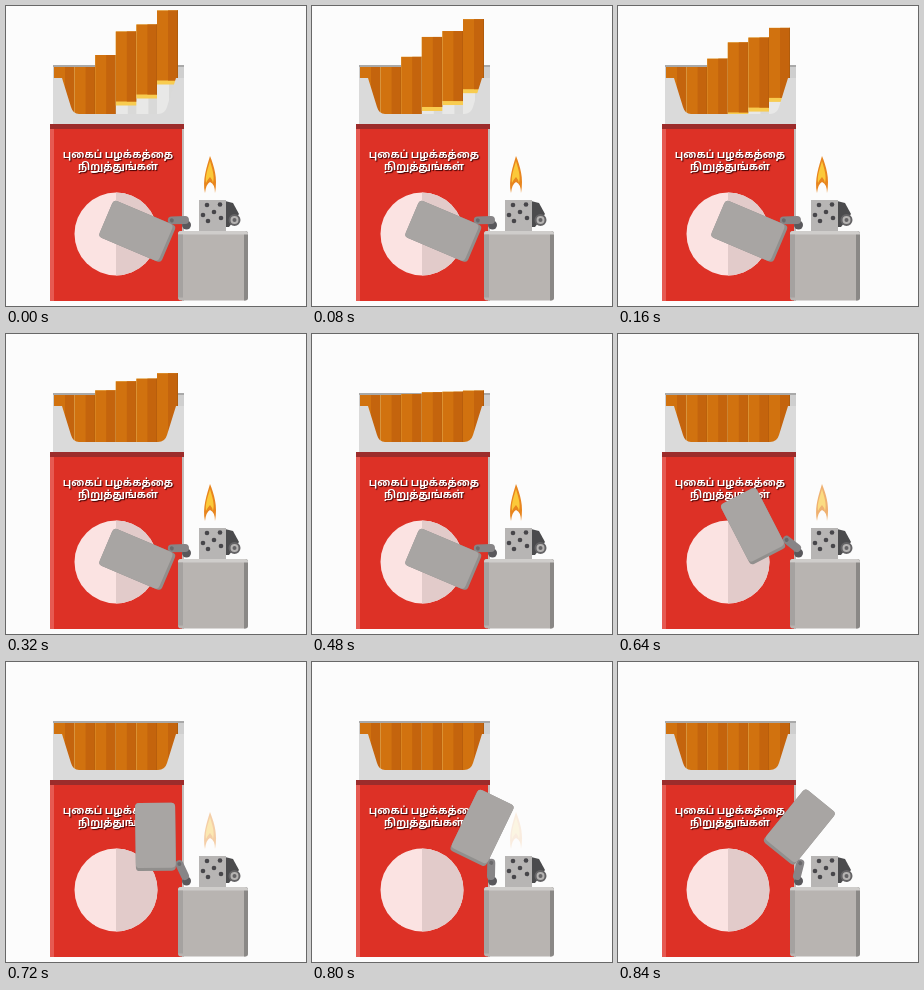
Write an HTML page that moves like this. It is 300x300 px and loops after 1.6 s.

```html
<!DOCTYPE html>
<html lang="ta">
<head>
<meta charset="utf-8">
<style>
html, body { margin: 0; width: 100%; height: 100%; overflow: hidden; background: #fcfcfc; }
svg { display: block; width: 100%; height: 100%; }
text { font: bold 10.2px "Noto Sans Tamil", "Noto Sans", sans-serif; fill: #fff; text-anchor: middle; text-shadow: 1px 1px 1px #400; }
</style>
</head>
<body>
<svg viewBox="0 0 300 300">
  <defs>
    <g id="cig">
      <rect width="21" height="120" fill="#e8e8e7"/>
      <rect x="12" width="9" height="120" fill="#d9d9d8"/>
      <rect width="21" height="74" fill="#f8cc50"/>
      <rect width="21" height="70" fill="#d1720f"/>
      <rect x="11" width="10" height="70" fill="#c4640d"/>
      <rect x="20" width="1" height="70" fill="#b05c0c"/>
    </g>
    <clipPath id="inside"><rect width="300" height="112"/></clipPath>
  </defs>

  <!-- pack -->
  <rect x="47" y="59" width="131" height="59" fill="#cfcfcf"/>
  <rect x="47" y="59" width="131" height="2" fill="#a9a9a9"/>
  <g id="cigs" clip-path="url(#inside)"></g>
  <path d="M47 72h9l9 29q2 7 8 7h79q7 0 9-7l9-29h8v46H47z" fill="#dadada"/>
  <rect x="44" y="118" width="132" height="177" fill="#dd3126"/>
  <rect x="44" y="118" width="4" height="177" fill="#e65a52"/>
  <rect x="176" y="118" width="2" height="177" fill="#c3bcba"/>
  <rect x="44" y="118" width="134" height="5" fill="#9c2c2b"/>
  <circle cx="110" cy="228" r="41.5" fill="#fbe3e2"/>
  <path d="M110 186.5a41.5 41.5 0 0 1 0 83z" fill="#e2cbca"/>
  <text x="112" y="151.5">புகைப் பழக்கத்தை</text>
  <text x="112" y="164">நிறுத்துங்கள்</text>

  <!-- lighter -->
  <g id="flame">
    <path d="M204 150C208 160 212 172 209 187Q209 178 204 176Q200 178 199 187C196 174 201 160 204 150z" fill="#e8851e"/>
    <path d="M204 155C206 162 209 170 207 177Q206 173 204 171Q202 173 200 177C199 170 202 162 204 155z" fill="#fbc93a"/>
  </g>
  <path d="M219 195l8 2 6 11-10 13h-4z" fill="#4b4b4d"/>
  <circle cx="228.5" cy="214" r="5" fill="#b5b3b2" stroke="#646365" stroke-width="2"/>
  <circle cx="228.5" cy="214" r="2" fill="#646365"/>
  <rect x="193" y="194" width="27" height="31" fill="#b7b5b4"/>
  <g id="holes" fill="#47464a"></g>
  <circle cx="180.5" cy="219" r="4.5" fill="#59585c"/>
  <rect x="172" y="225" width="70" height="69.5" rx="3" fill="#b8b4b1"/>
  <path d="M238 225h1q3 0 3 3v63.500q0 3-3 3h-1z" fill="#8a8886"/>
  <path d="M172 228.500v-.5q0-3 3-3h64q3 0 3 3v.5z" fill="#cfcdcb"/>
  <rect x="172" y="228.500" width="5" height="63" fill="#a5a2a0"/>
  <g id="lid">
    <path d="M-5.500-12L0 0" stroke="#878587" stroke-width="8" stroke-linecap="round"/>
    <circle cx="-5.500" cy="-12" r="2" fill="#6a696b"/>
    <rect x="-49" y="-73.500" width="40" height="68" rx="4" fill="#918f8d"/>
    <rect x="-49" y="-73.500" width="40" height="65" rx="4" fill="#a8a5a3"/>
  </g>
</svg>
<script>
const $ = id => document.getElementById(id);
const REST = 61, STEP = 40, LOOP = 1600, SWITCH = 520, END = 840;
const tops = [61, 61, 49, 25.5, 18.5, 4.5];
const holes = [[201, 199], [214, 198.5], [208, 206], [197, 209], [202, 215], [215, 212]];

$("cigs").innerHTML = tops.map(() => `<use href="#cig"/>`).join("");
$("holes").innerHTML = holes.map(([x, y]) => `<circle cx="${x}" cy="${y}" r="2.3"/>`).join("");
const cigs = [...$("cigs").children];

function draw(now) {
  const t = Math.floor(now % LOOP / STEP) * STEP;
  const sink = Math.min(1, t / SWITCH);
  const close = Math.max(0, Math.min(1, (t - SWITCH) / (END - SWITCH)));
  cigs.forEach((c, i) => {
    const y = tops[i] + (REST - tops[i]) * sink;
    c.setAttribute("transform", `translate(${48 + i * 20.6} ${y})`);
  });
  $("lid").setAttribute("transform", `translate(179 214) rotate(${-67 + 106 * close})`);
  $("flame").setAttribute("opacity", 1 - close);
}

const start = performance.now();
function tick() {
  draw(performance.now() - start);
  requestAnimationFrame(tick);
}
tick();
</script>
</body>
</html>
```
